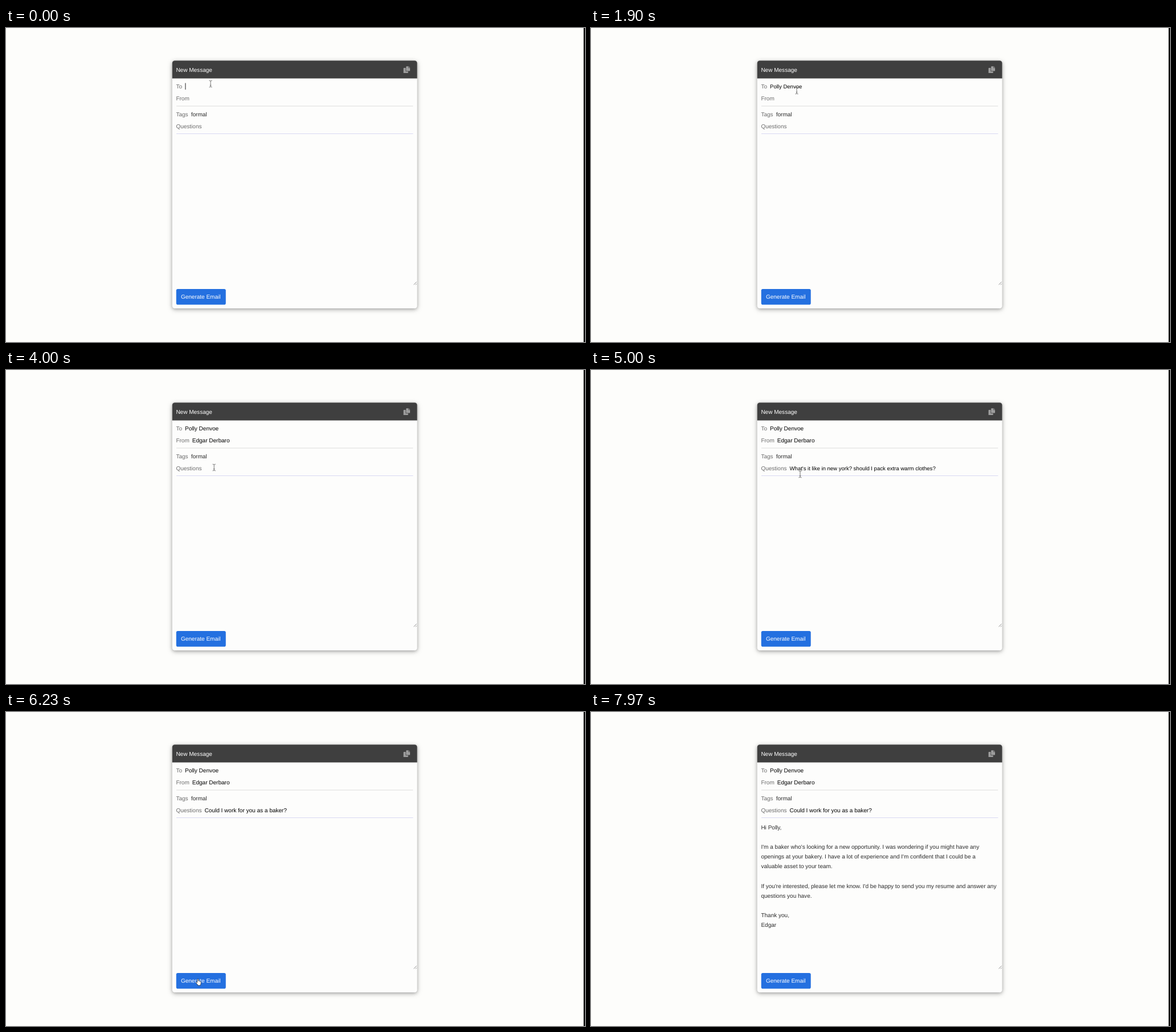
An HTML page for the animation above (8000 ms loop, 1016x551 px).

```html
<!DOCTYPE html>
<html lang="en">
<head>
<meta charset="utf-8">
<title>New Message</title>
<style>
  html, body { margin: 0; width: 100%; height: 100%; overflow: hidden; background: #fdfdfb; }
  svg { display: block; width: 1016px; height: 551px; }
  text { font: 10.02px "Liberation Sans", Arial, sans-serif; text-rendering: geometricPrecision; white-space: pre; }
  .label { fill: #6c6c6c; }
  .value { fill: #000; }
  .body { fill: #2c2c2c; }
  .light { fill: #fff; }
  .card { filter: drop-shadow(0 2px 4px rgba(0,0,0,.27)) drop-shadow(0 1px 2px rgba(0,0,0,.16)); }
</style>
</head>
<body>
<svg viewBox="0 0 1016 551">
  <rect width="1016" height="551" fill="#fdfdfb"/>
  <rect x="1013.6" width="2.4" height="551" fill="#000"/>
  <rect class="card" x="291.7" y="57.3" width="429.8" height="434.7" rx="4.5" fill="#fdfdfc"/>
  <path d="M291.7 88.4V61.8a4.5 4.5 0 0 1 4.5-4.5H717a4.5 4.5 0 0 1 4.5 4.5V88.4Z" fill="#3f3f3f"/>
  <text class="light" x="298.4" y="76.6">New Message</text>
  <g fill="#9d9d9d">
    <path d="M698.2 70h3.2v6.2h4.2v2.3q0 .6-.7.6h-6.7q-.7 0-.7-.7v-7.700q0-.7.7-.7Z"/>
    <path d="M702.800 67.300h3.300v2.900h2.900v4.600q0 .7-.7.7h-5.500q-.7 0-.7-.7v-6.800q0-.7.7-.7ZM706.700 67.300l2.300 2.300h-2.300Z"/>
  </g>
  <g class="label">
    <text x="298.4" y="106.100">To</text>
    <text x="298.4" y="126.900">From</text>
    <text x="298.4" y="154.700">Tags</text>
    <text x="298.4" y="175.500">Questions</text>
  </g>
  <text class="body" x="324.700" y="154.700">formal</text>
  <path d="M299 137H714.300" stroke="#dddddd"/>
  <path d="M299 185.500H714.300" stroke="#d9d9f3" stroke-width="1.200"/>
  <path d="M715.500 450.500l5-5M718.700 450.700l2-2" stroke="#777" stroke-width=".8"/>
  <g id="fields" class="value"></g>
  <g id="letter" class="body"></g>
  <rect id="button" x="298.700" y="458" height="27.500" rx="2.800" fill="#2470e0"/>
  <text id="caption" class="light" x="306.900" y="475.300"></text>
  <rect id="caret" width="1" height="11.500" fill="#222"/>
  <g id="beam" fill="none" stroke="#666" stroke-width=".9">
    <path d="M-2.500-5.800Q0-5.800 0-4.300V4.300Q0 5.800-2.500 5.800M2.500-5.800Q0-5.800 0-4.300M0 4.300Q0 5.800 2.500 5.800M-1.300 2.700H1.300"/>
  </g>
  <path id="hand" fill="#fff" stroke="#222" stroke-width=".7" stroke-linejoin="round"
    d="M-2.200-4.800q0-1 .9-1t.9 1v2.800q1.200-.6 1.600.3 1.200-.5 1.600.5 1.300-.3 1.300.9V2q0 1.500-.9 2.500V5.800H-1.600V4.600Q-3 3.300-4.200 1.200q-.6-1.200.4-1.400.8 0 1.600 1Z"/>
  <path id="arrow" fill="#111" stroke="#fff" stroke-width=".7" d="M-3-6V4.600L-.6 2.400 1 6 2.600 5.300 1 1.800H4.200Z"/>
</svg>
<script>
const LOOP = 8000, FONT = 10.02, PREVIEW_FONT = 9.545, BLINK = 530;
const $ = id => document.getElementById(id);

function addText(parent, x, y, content = "") {
  const node = document.createElementNS("http://www.w3.org/2000/svg", "text");
  node.setAttribute("x", x);
  node.setAttribute("y", y);
  node.textContent = content;
  return parent.appendChild(node);
}

// Suggestions show in a smaller face until one is picked.
const lastQuestion = "Could I work for you as a baker?";
const fields = [
  { x: 314.1, y: 106.1, focus: -80, pick: 2230, blur: 2700,
    previews: [[1500, "Polly Denvoe"]], final: "Polly Denvoe" },
  { x: 326.8, y: 126.9, focus: 2700, pick: 3300, blur: 4100,
    previews: [[2950, "Edgar Derbaro"]], final: "Edgar Derbaro" },
  { x: 348.6, y: 175.5, focus: 4100, pick: 5500, blur: 6620,
    previews: [[4700, "What's it like in new york? should I pack extra warm clothes?"], [5230, lastQuestion]],
    final: lastQuestion }
];
fields.forEach(f => {
  f.node = addText($("fields"), f.x, f.y);
  f.node.textContent = f.final;
  f.width = f.node.getComputedTextLength();
});

[
  "Hi Polly,",
  "",
  "I'm a baker who's looking for a new opportunity. I was wondering if you might have any",
  "openings at your bakery. I have a lot of experience and I'm confident that I could be a",
  "valuable asset to your team.",
  "",
  "If you're interested, please let me know. I'd be happy to send you my resume and answer any",
  "questions you have.",
  "",
  "Thank you,",
  "Edgar"
].forEach((line, i) => addText($("letter"), 298.4, 205.6 + i * 17.18, line));

// Pointer stops: time, x, y. Equal times make a jump.
const path = [
  [0, 359, 98], [1370, 359, 98], [1500, 361, 110], [2200, 361, 110],
  [2650, 338, 123], [2850, 338, 123], [2950, 338, 133], [3300, 338, 133],
  [3420, 340, 143], [3600, 340, 143], [4050, 366, 172], [4530, 366, 172],
  [4700, 367, 183], [5500, 367, 183], [5500, 367, 250], [5900, 367, 250],
  [6080, 338, 504], [6200, 338, 474], [LOOP, 338, 474]
];

function pointerAt(t) {
  const i = path.findIndex(p => p[0] > t);
  const [t0, x0, y0] = path[i - 1], [t1, x1, y1] = path[i];
  const k = (t - t0) / (t1 - t0), e = k * k * (3 - 2 * k);
  return [x0 + (x1 - x0) * e, y0 + (y1 - y0) * e];
}

const show = (id, on) => $(id).setAttribute("visibility", on ? "visible" : "hidden");

function drawFields(t) {
  let caretOn = false;
  for (const f of fields) {
    const picked = t >= f.pick;
    const preview = f.previews.filter(p => t >= p[0]).pop();
    f.node.textContent = picked ? f.final : preview ? preview[1] : "";
    f.node.style.fontSize = (picked ? FONT : PREVIEW_FONT) + "px";

    const active = t >= f.focus && t < f.blur && (picked || !preview);
    if (!active) continue;
    const since = t - (picked ? f.pick : f.focus);
    caretOn = Math.floor(since / BLINK) % 2 === 0;
    $("caret").setAttribute("x", f.x + (picked ? f.width + .5 : .3));
    $("caret").setAttribute("y", f.y - 9.5);
  }
  show("caret", caretOn);
}

function drawPointer(t) {
  const [x, y] = pointerAt(t);
  const shape = y < 452 ? "beam" : y > 458 && y < 486 ? "hand" : "arrow";
  for (const id of ["beam", "hand", "arrow"]) {
    show(id, id === shape && t < 6620);
    $(id).setAttribute("transform", `translate(${x.toFixed(2)} ${y.toFixed(2)})`);
  }
}

function draw(t) {
  const loading = t >= 6620 && t < 7550;
  drawFields(t);
  drawPointer(t);
  $("button").setAttribute("width", loading ? 61.3 : 87);
  $("caption").textContent = loading ? "Loading..." : "Generate Email";
  show("letter", t >= 7550);
}

function tick() {
  draw(performance.now() % LOOP);
  requestAnimationFrame(tick);
}
tick();
</script>
</body>
</html>
```
